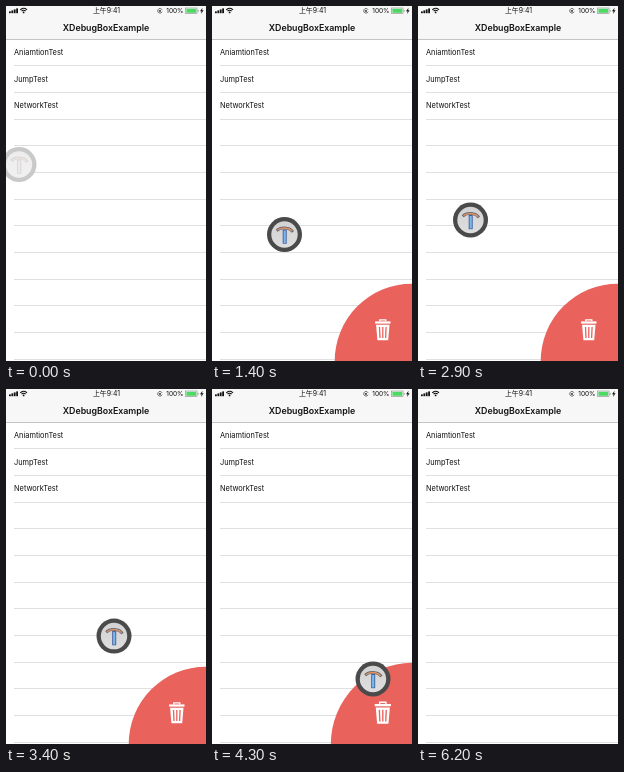
Recreate the animation shown at these times as an HTML page with a canvas. Size 200 by 355 pixels, loop 7000 ms.

```html
<!DOCTYPE html>
<html lang="en">
<head>
<meta charset="utf-8">
<title>Debug box</title>
<style>
html, body { margin: 0; width: 100%; height: 100%; overflow: hidden; background: #fff; }
canvas { display: block; width: 200px; height: 355px; }
</style>
</head>
<body>
<canvas id="stage"></canvas>
<script>
const W = 200, H = 355, LOOP = 7000, STEP = 100;
const UI = 'Inter, "Noto Sans", sans-serif';
const CJK = 'Inter, "Noto Sans CJK SC", "Noto Sans CJK", sans-serif';
const RED = '#e9635c';
const ACTIVE = {
  ring: '#4a4a4a', top: '#d2d2d2', bottom: '#dedede',
  grip: '#3f5f9c', gripFill: '#7db8ec', head: '#5d5f74', headFill: '#e0955f'
};
const IDLE = {
  ring: '#c9c9c9', top: '#ededed', bottom: '#f0f0f0',
  grip: '#d8d2d2', gripFill: '#ececec', head: '#d8d2d2', headFill: '#ebe4e2'
};
const canvas = document.getElementById('stage');
const ctx = canvas.getContext('2d');
const dpr = window.devicePixelRatio || 1;
canvas.width = W * dpr;
canvas.height = H * dpr;

// Drag path: time, x, y
const PATH = [
  [800, 13, 158.5], [1000, 27, 180], [1200, 52, 211], [1400, 72.5, 228.5],
  [1600, 77, 226], [1900, 72, 199], [2200, 60.5, 169], [2500, 50, 178],
  [2900, 52.5, 214], [3100, 74.5, 233.5], [3500, 118, 251], [3900, 149, 267],
  [4300, 161, 290], [4600, 160, 312], [4900, 157, 319.5], [5500, 158, 321]
];

const clamp = v => Math.max(0, Math.min(1, v));
const ease = v => { v = clamp(v); return v * v * (3 - 2 * v); };
const span = (t, from, to) => ease((t - from) / (to - from));

function slope(i, axis) {
  const a = PATH[i - 1], b = PATH[i + 1];
  return a && b ? (b[axis] - a[axis]) / (b[0] - a[0]) : 0;
}

function position(t) {
  const last = PATH.length - 1;
  if (t <= PATH[0][0]) return PATH[0].slice(1);
  if (t >= PATH[last][0]) return PATH[last].slice(1);
  let i = 0;
  while (t >= PATH[i + 1][0]) i++;
  const a = PATH[i], b = PATH[i + 1], d = b[0] - a[0], u = (t - a[0]) / d;
  const h = u * u * (3 - 2 * u);
  return [1, 2].map(k =>
    a[k] * (1 - h) + b[k] * h +
    d * u * (1 - u) * ((1 - u) * slope(i, k) - u * slope(i + 1, k)));
}

function rect(x, y, w, h, color) {
  ctx.fillStyle = color;
  ctx.fillRect(x, y, w, h);
}

function disc(x, y, r, color) {
  ctx.fillStyle = color;
  ctx.beginPath();
  ctx.arc(x, y, r, 0, Math.PI * 2);
  ctx.fill();
}

function poly(points, color) {
  ctx.fillStyle = color;
  ctx.beginPath();
  points.forEach(([x, y]) => ctx.lineTo(x, y));
  ctx.closePath();
  ctx.fill();
}

function stroke(d, color, width) {
  ctx.strokeStyle = color;
  ctx.lineWidth = width;
  ctx.stroke(new Path2D(d));
}

function text(str, x, y, font, align = 'left') {
  ctx.fillStyle = '#111';
  ctx.font = font;
  ctx.textAlign = align;
  ctx.textBaseline = 'alphabetic';
  ctx.fillText(str, x, y);
}

function statusBar() {
  for (let i = 0; i < 4; i++) rect(3 + i * 2.4, 5.4 - i, 1.8, 1.8 + i, '#111');
  for (const r of [4.6, 2.8]) {
    ctx.strokeStyle = '#111';
    ctx.lineWidth = 1.1;
    ctx.beginPath();
    ctx.arc(17.6, 7, r, -Math.PI * 0.76, -Math.PI * 0.24);
    ctx.stroke();
  }
  disc(17.6, 6.4, 0.9, '#111');
  text('上午9:41', 100.5, 7.4, '6.9px ' + CJK, 'center');
  ctx.strokeStyle = '#333';
  ctx.lineWidth = 0.7;
  ctx.beginPath();
  ctx.arc(154, 4.8, 2.3, 0.4, 5.8);
  ctx.stroke();
  rect(153.1, 4.2, 1.8, 1.5, '#222');
  text('100%', 177.5, 7.2, '6.5px ' + UI, 'right');
  ctx.strokeStyle = '#8a8a8a';
  ctx.lineWidth = 0.6;
  ctx.strokeRect(179.6, 2, 11.4, 5.6);
  rect(180.4, 2.8, 9.8, 4, '#4cd964');
  rect(191.7, 3.9, 0.8, 1.9, '#8a8a8a');
  poly([[196.6, 1.8], [194, 5.3], [195.6, 5.3], [195, 8], [197.6, 4.3], [196, 4.3]], '#111');
}

function page() {
  rect(0, 0, W, H, '#fff');
  rect(0, 0, W, 33, '#f7f7f7');
  rect(0, 33, W, 1, '#c4c4c6');
  statusBar();
  text('XDebugBoxExample', 100, 25, '600 8.8px ' + UI, 'center');
  for (let i = 1; i <= 12; i++) rect(8, Math.floor(33 + i * 80 / 3 + 0.01), W - 8, 1, '#e0e0e2');
  ['AniamtionTest', 'JumpTest', 'NetworkTest'].forEach((label, i) =>
    text(label, 8, Math.round(48.9 + i * 80 / 3), '7.4px ' + UI));
}

function trash(x, y, scale) {
  ctx.save();
  ctx.translate(x, y);
  ctx.scale(scale, scale);
  stroke('M-3 -8.2 V-10 H3 V-8.2', '#fff', 1.3);
  rect(-7.7, -8.4, 15.4, 2.2, '#fff');
  poly([[-6.7, -5], [6.7, -5], [5.4, 10.5], [-5.4, 10.5]], '#fff');
  stroke('M-3.3 -2.8 L-2.8 8.2 M0 -2.8 V8.2 M3.3 -2.8 L2.8 8.2', RED, 1.3);
  ctx.restore();
}

function bin(shown, grow) {
  if (shown <= 0) return;
  const off = (1 - shown) * 78, scale = 1 + 0.1 * grow;
  disc(W + off, H + off, 77.3 * scale, RED);
  trash(170.8 + off, 323.8 + off, scale);
}

function ball(x, y, c) {
  ctx.save();
  ctx.translate(x, y);
  disc(0, 0, 17.5, c.ring);
  const face = ctx.createLinearGradient(0, -13, 0, 13);
  face.addColorStop(0, c.top);
  face.addColorStop(1, c.bottom);
  disc(0, 0, 13.2, face);
  stroke('M0.2 -5 V9.2', c.grip, 4);
  stroke('M0.2 -4 V8.5', c.gripFill, 2.2);
  stroke('M-7.8 -3.8 Q-4 -7.4 2 -6.4 Q6 -6 8.4 -2.6', c.head, 2.8);
  stroke('M-7.2 -4.2 Q-4 -7.2 2 -6.3 Q5.6 -5.8 7.8 -3.2', c.headFill, 1.4);
  ctx.restore();
}

function draw(t) {
  ctx.setTransform(dpr, 0, 0, dpr, 0, 0);
  page();
  bin(span(t, 800, 1200) * (1 - span(t, 5500, 5900)), span(t, 4100, 4500));
  if (t < 5600) ball(...position(t), t < 800 ? IDLE : ACTIVE);
}

const start = performance.now();
function tick() {
  const t = (performance.now() - start) % LOOP;
  draw(Math.floor(t / STEP) * STEP);
  requestAnimationFrame(tick);
}
tick();
</script>
</body>
</html>
```
